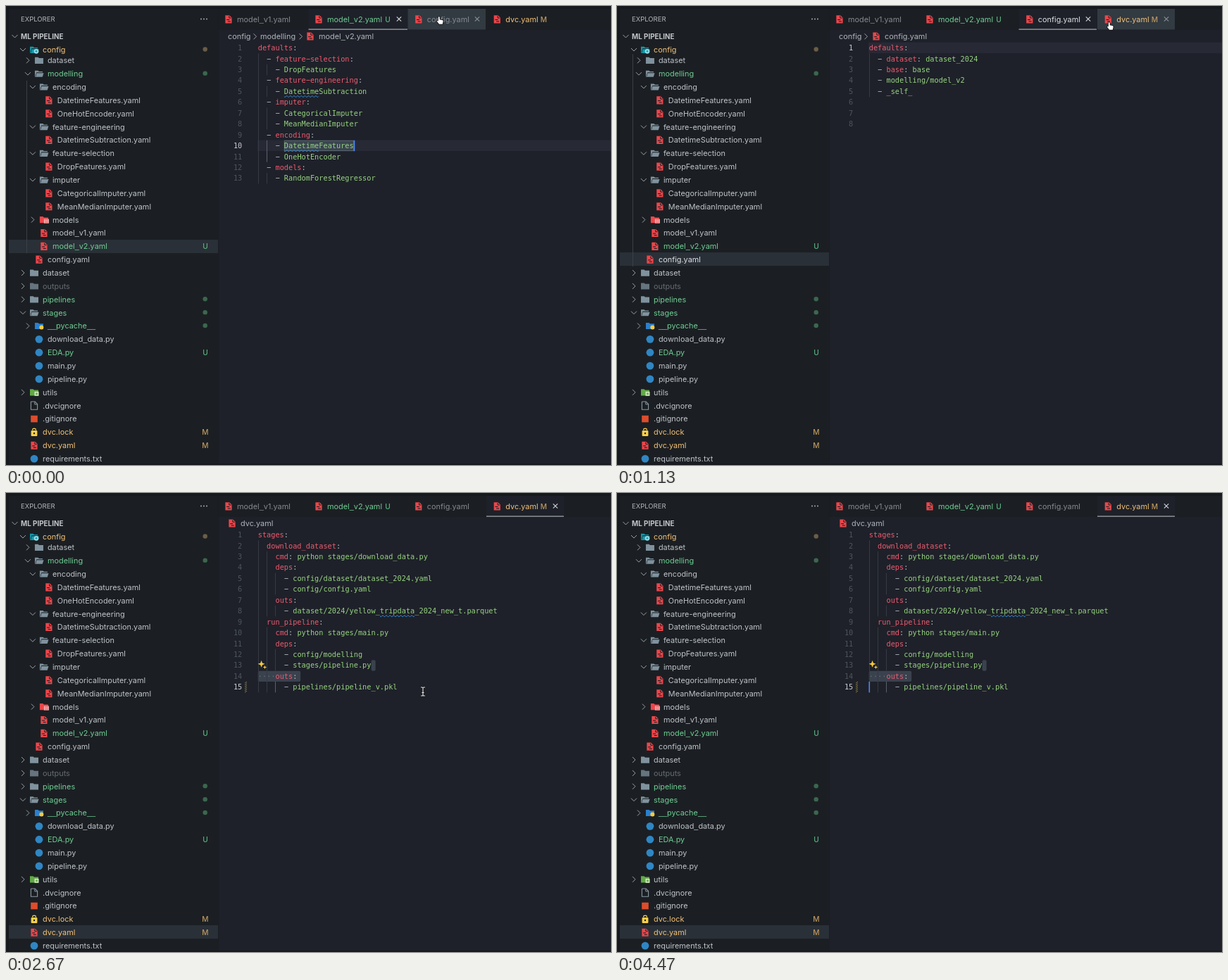
Animation of 859 by 652 pixels, one loop 4.51 s. Source, as an HTML page with a canvas:

```html
<!DOCTYPE html>
<html lang="en">
<head>
<meta charset="utf-8">
<title>YAML pipeline editor</title>
<style>
html, body { margin: 0; width: 100%; height: 100%; overflow: hidden; background: #16191d; }
canvas { display: block; width: 859px; height: 652px; }
</style>
</head>
<body>
<canvas id="stage" width="859" height="652"></canvas>
<script>
const ctx = document.getElementById('stage').getContext('2d');
const LOOP = 4510, OPEN_CONFIG = 200, OPEN_DVC = 2070, HIDE_MOUSE = 3900;
const UI = 'Inter, "Open Sans", sans-serif';
const WIDE = '"Liberation Sans", sans-serif';
const MONO = '10.28px "DejaVu Sans Mono", monospace';
const CHAR = 6.19, LINE = 15.43, ROW = 18.86, CODE_X = 357.7;
const C = {
  edge: '#16191d', side: '#1b1f23', editor: '#1e2129', row: '#2a3037',
  text: '#bec3c9', dim: '#666c73', tab: '#858a90', white: '#dde0e3',
  green: '#6fcd93', yellow: '#f2c077', mark: '#bd975e',
  key: '#ef596f', value: '#97d381', punct: '#b5bac2', red: '#ec464b', folder: '#7f929d'
};

// Tree rows: depth, icon, label, state (U, M, g = green dot, d = dimmed)
const tree = [
  [2, 'folder', 'dataset'], [2, 'open', 'modelling', 'g'],
  [3, 'open', 'encoding'], [4, 'yaml', 'DatetimeFeatures.yaml'], [4, 'yaml', 'OneHotEncoder.yaml'],
  [3, 'open', 'feature-engineering'], [4, 'yaml', 'DatetimeSubtraction.yaml'],
  [3, 'open', 'feature-selection'], [4, 'yaml', 'DropFeatures.yaml'],
  [3, 'open', 'imputer'], [4, 'yaml', 'CategoricalImputer.yaml'], [4, 'yaml', 'MeanMedianImputer.yaml'],
  [3, 'models', 'models'], [3, 'yaml', 'model_v1.yaml'], [3, 'yaml', 'model_v2.yaml', 'U'],
  [2, 'yaml', 'config.yaml'],
  [1, 'folder', 'dataset'], [1, 'folder', 'outputs', 'd'], [1, 'folder', 'pipelines', 'g'],
  [1, 'open', 'stages', 'g'], [2, 'cache', '__pycache__', 'g'],
  [2, 'py', 'download_data.py'], [2, 'py', 'EDA.py', 'U'], [2, 'py', 'main.py'], [2, 'py', 'pipeline.py'],
  [1, 'utils', 'utils'], [1, 'blank', '.dvcignore'], [1, 'git', '.gitignore'],
  [1, 'lock', 'dvc.lock', 'M'], [1, 'yaml', 'dvc.yaml', 'M'], [1, 'py', 'requirements.txt']
];

const tabs = [
  { x: 302, w: 128, label: 'model_v1.yaml' },
  { x: 429.5, w: 140.5, label: 'model_v2.yaml', badge: 'U', badgeX: 542 },
  { x: 570.5, w: 110.5, label: 'config.yaml' },
  { x: 682, w: 110, label: 'dvc.yaml', badge: 'M', badgeX: 763.5 }
];

// Guides: column, first line, last line, active
const docs = {
  model: {
    tab: 1, row: 14, guide: [29.5, 2, 14], crumbs: [['config', 315, 353], ['modelling', 361, 418]],
    file: 444, current: 10, highlight: true, caret: 22,
    guides: [[0, 2, 13], [2, 3, 3], [2, 5, 5], [2, 7, 8], [2, 10, 11, true], [2, 13, 13]],
    waves: [[5, 6], [10, 6]],
    lines: `defaults:
  - feature-selection:
    - DropFeatures
  - feature-engineering:
    - DatetimeSubtraction
  - imputer:
    - CategoricalImputer
    - MeanMedianImputer
  - encoding:
    - DatetimeFeatures
    - OneHotEncoder
  - models:
    - RandomForestRegressor`.split('\n')
  },
  config: {
    tab: 2, row: 15, guide: [22.5, 0, 15], crumbs: [['config', 315, 353]],
    file: 380, current: 1, highlight: true, caret: 0,
    guides: [[0, 2, 5]], waves: [],
    lines: `defaults:
  - dataset: dataset_2024
  - base: base
  - modelling/model_v2
  - _self_


`.split('\n')
  },
  dvc: {
    tab: 3, row: 29, crumbs: [], file: 333, current: 15, caret: 0,
    guides: [[0, 2, 15], [2, 3, 8], [2, 10, 15], [4, 5, 6], [4, 8, 8], [4, 12, 13], [4, 15, 15, true]],
    waves: [[8, 28]],
    lines: `stages:
  download_dataset:
    cmd: python stages/download_data.py
    deps:
      - config/dataset/dataset_2024.yaml
      - config/config.yaml
    outs:
      - dataset/2024/yellow_tripdata_2024_new_t.parquet
  run_pipeline:
    cmd: python stages/main.py
    deps:
      - config/modelling
      - stages/pipeline.py
    outs:
      - pipelines/pipeline_v.pkl`.split('\n')
  }
};

// Mouse path: start, end, from, to
const moves = [
  [680, 950, [615, 21], [699, 29]],
  [2230, 2630, [699, 29], [592, 282]],
  [2720, 3050, [592, 282], [565, 304]]
];

const lineY = n => 59.6 + (n - 1) * LINE;
const rowY = i => 77.3 + i * ROW;
const colX = c => CODE_X + c * CHAR;

function rect(x, y, w, h, color) {
  ctx.fillStyle = color;
  ctx.fillRect(x, y, w, h);
}
function round(x, y, w, h, r, color) {
  ctx.fillStyle = color;
  ctx.beginPath();
  ctx.roundRect(x, y, w, h, r);
  ctx.fill();
}
function disc(x, y, r, color) {
  ctx.fillStyle = color;
  ctx.beginPath();
  ctx.arc(x, y, r, 0, 7);
  ctx.fill();
}
function poly(points, x, y, color, stroke) {
  ctx.beginPath();
  points.forEach(([px, py]) => ctx.lineTo(x + px, y + py));
  if (stroke) {
    ctx.strokeStyle = color;
    ctx.lineWidth = stroke;
    ctx.stroke();
  } else {
    ctx.fillStyle = color;
    ctx.fill();
  }
}
// Underscores use a font with a wider underscore than the interface font.
function label(s, x, y, color, size = 10.9, weight = 400) {
  ctx.textAlign = 'left';
  ctx.fillStyle = color;
  for (const part of s.split(/(_+)/)) {
    ctx.font = `${weight} ${size}px ${part[0] === '_' ? WIDE : UI}`;
    ctx.fillText(part, x, y + size * 0.36);
    x += ctx.measureText(part).width;
  }
}
function badge(s, x, y) {
  ctx.font = `500 10.2px ${UI}`;
  ctx.textAlign = 'center';
  ctx.fillStyle = s === 'U' ? '#58b27e' : C.mark;
  ctx.fillText(s, x, y + 3.7);
}
function code(s, x, y, color, align = 'left') {
  ctx.font = MONO;
  ctx.textAlign = align;
  ctx.fillStyle = color;
  ctx.fillText(String(s).replace(/-/g, '\u2212'), x, y + 3.6);
}
function chevron(x, y, open) {
  poly(open ? [[-4, -2], [0, 2], [4, -2]] : [[-2, -4], [2, 0], [-2, 4]], x, y, '#9ba1a8', 1);
}
function cross(x, y, color) {
  poly([[-3.2, -3.2], [3.2, 3.2]], x, y, color, 1.1);
  poly([[-3.2, 3.2], [3.2, -3.2]], x, y, color, 1.1);
}

const page = [[-4.6, -5.6], [1.2, -5.6], [4.6, -2.2], [4.6, 5.6], [-4.6, 5.6]];
function folder(x, y, color) {
  poly([[-6, -4.5], [-1.5, -4.5], [0, -3.2], [6, -3.2], [6, 4.6], [-6, 4.6]], x, y, color);
}
function openFolder(x, y, color) {
  poly([[-6, -4.5], [-1.5, -4.5], [0, -3.2], [5, -3.2], [5, -2], [-3.6, -2], [-5.2, 3], [-5.2, 4.6], [-6, 4.6]], x, y, color);
  poly([[-3.4, -1], [6.6, -1], [4.8, 4.6], [-5, 4.6]], x, y, color);
}
const icons = {
  folder: (x, y) => folder(x, y, C.folder),
  open: (x, y) => openFolder(x, y, C.folder),
  config(x, y) {
    openFolder(x, y, '#1597a8');
    disc(x + 3, y + 2, 3.4, '#8ddde6');
    disc(x + 3, y + 2, 1.3, '#1597a8');
  },
  models(x, y) {
    folder(x, y, C.red);
    rect(x, y - 1, 7, 6, '#f4b9bb');
    for (let i = 0; i < 3; i++) rect(x + 1, y + i * 2 - .2, 5, .8, C.red);
  },
  cache(x, y) {
    folder(x, y, '#2a80cf');
    disc(x + 3.4, y + 2, 3, '#f5c945');
  },
  utils(x, y) {
    folder(x, y, '#62a947');
    rect(x + .5, y - 1, 6, 6, '#cfe8bc');
    disc(x + 3.5, y + 2, 1.5, '#62a947');
  },
  yaml(x, y) {
    poly(page, x, y, C.red);
    poly([[.8, -4.8], [.8, -1.8], [3.8, -1.8]], x, y, C.side, 1);
    rect(x - 2.8, y + .1, 4, 1.1, C.side);
    rect(x - 1.2, y + 2.6, 4, 1.1, C.side);
  },
  blank(x, y) {
    poly([...page, page[0]], x, y, '#8b99a3', 1.1);
    poly([[.8, -5.2], [.8, -1.8], [4.2, -1.8]], x, y, '#8b99a3', 1);
  },
  py: (x, y) => disc(x, y, 5.4, '#2f86c4'),
  git: (x, y) => rect(x - 4.8, y - 4.8, 9.6, 9.6, '#dd4c2c'),
  lock(x, y) {
    ctx.strokeStyle = '#f7cf4b';
    ctx.lineWidth = 1.3;
    ctx.beginPath();
    ctx.arc(x, y - 2.8, 2.5, Math.PI, 0);
    ctx.stroke();
    round(x - 4.4, y - 2.3, 8.8, 7.8, 1, '#f7cf4b');
    disc(x, y + 1.6, 1.2, C.side);
  }
};
const containers = ['folder', 'open', 'models', 'cache', 'utils'];
const stateColor = { U: C.green, g: C.green, M: C.yellow, d: C.dim };

function drawSidebar(doc) {
  rect(4, 4, 297.5, 646, C.side);
  label('EXPLORER', 21, 18.7, '#b2b7bd', 9.5);
  for (let i = -1; i < 2; i++) disc(281 + i * 4, 18.5, .9, '#b5bac0');
  chevron(12.5, 43, true);
  label('ML PIPELINE', 21, 43, '#c2c6cb', 9.85, 700);

  rect(4, Math.round(rowY(doc.row) - 9.8), 297, 19, C.row);
  if (doc.guide) {
    const [x, from, to] = doc.guide;
    rect(x - .5, rowY(from) - 9, 1, (to - from + 1) * ROW, '#3a4046');
  }
  chevron(24, 62, true);
  icons.config(40, 62.3);
  label('config', 52, 62, C.yellow);
  disc(282.7, 61.5, 3.2, '#6b5d47');

  tree.forEach(([depth, icon, name, state], i) => {
    const x = 52 + (depth - 1) * 6.95, y = rowY(i);
    if (containers.includes(icon)) chevron(x - 28, y, icon === 'open');
    ctx.globalAlpha = state === 'd' ? .75 : 1;
    icons[icon](x - 12, y);
    ctx.globalAlpha = 1;
    label(name, x, y, stateColor[state] || (i === doc.row ? C.white : C.text));
    if (state === 'g') disc(282.7, y - .5, 3.2, '#3c674e');
    if (state === 'U' || state === 'M') badge(state, 283, y);
  });
}

function drawTabs(doc, mouse) {
  rect(301.5, 4, 557.5, 29.5, C.side);
  tabs.forEach((tab, i) => {
    const active = i === doc.tab;
    const hover = mouse.y < 34 && mouse.x >= tab.x && mouse.x < tab.x + tab.w;
    if (active || hover) {
      rect(tab.x, 4, tab.w, 29.5, hover ? (active ? '#2b3137' : '#323a42') : C.editor);
      cross(tab.x + tab.w - 12, 18.5, active ? '#d5d8dc' : '#8b9197');
    }
    if (active) rect(tab.x, 32.6, tab.w, 1, '#c4c7cb');
    const x = i === 1 ? 456 : i === 0 ? 328 : tab.x + 27.3;
    icons.yaml(x - 12, 18.8);
    label(tab.label, x, 19, stateColor[tab.badge] || (active ? C.white : C.tab));
    if (tab.badge) badge(tab.badge, tab.badgeX, 18.8);
  });
}

function drawCrumbs(doc) {
  for (const [name, x, arrow] of doc.crumbs) {
    label(name, x, 43.3, '#afb4ba');
    chevron(arrow + .5, 43.3);
  }
  icons.yaml(doc.file - 12, 43);
  label(tabs[doc.tab].label, doc.file, 43.3, '#afb4ba');
}

function drawCodeLine(line, y) {
  const [, pad, dash, rest] = line.match(/^( *)(- )?(.*)$/);
  const [, key, colon, value] = rest.match(/^(?:([\w-]+)(:))?(.*)$/);
  let col = pad.length;
  for (const [part, color] of [[dash, C.punct], [key, C.key], [colon, C.punct], [value, C.value]]) {
    if (!part) continue;
    code(part, colX(col), y, color);
    col += part.length;
  }
}

function wave(line, col) {
  ctx.strokeStyle = '#3489d8';
  ctx.lineWidth = 1;
  ctx.beginPath();
  for (let x = 0; x <= 8 * CHAR; x++) ctx.lineTo(colX(col) + x, lineY(line) + 7.2 + Math.sin(x * 1.22));
  ctx.stroke();
}

function star(x, y, r) {
  ctx.fillStyle = '#f7cb3d';
  ctx.beginPath();
  for (let i = 0; i < 8; i++) {
    const d = i % 2 ? r * .38 : r, a = i * Math.PI / 4;
    ctx.lineTo(x + d * Math.cos(a), y + d * Math.sin(a));
  }
  ctx.fill();
}

function drawSelection(doc) {
  if (doc === docs.model) {
    const y = lineY(10) - 7.6;
    rect(colX(6), y, 16 * CHAR, 15.2, '#3b4551');
    ctx.strokeStyle = '#59636f';
    ctx.lineWidth = 1;
    ctx.strokeRect(colX(6) + .5, y + .5, 16 * CHAR - 1, 14.2);
  }
  if (doc === docs.dvc) {
    round(colX(26), lineY(13) - 7.5, 6, LINE, 2, '#3a424e');
    round(colX(0), lineY(14) - 7.5, 60.5, LINE, 2, '#3a424e');
    for (let i = 0; i < 4; i++) disc(colX(i + .5), lineY(14), .7, '#707782');
  }
}

function drawGutterMarks() {
  star(362.6, 242.8, 5);
  star(367.5, 247.5, 2.8);
  const top = lineY(15) - 7.5;
  for (let y = 0; y < 15; y += 2.6) poly([[-1.5, 2.2], [1.5, 0]], 340.5, top + y, '#8d7c45', 1);
}

function drawEditor(doc, caretOn) {
  rect(301.5, 33.5, 557.5, 616.5, C.editor);
  drawCrumbs(doc);
  if (doc.highlight) rect(357, lineY(doc.current) - 7.9, 502, LINE, '#272a35');
  drawSelection(doc);
  for (const [col, from, to, active] of doc.guides)
    rect(Math.round(colX(col)), lineY(from) - 7.7, 1, (to - from + 1) * LINE, active ? '#59606b' : '#343a44');
  doc.lines.forEach((line, i) => {
    const y = lineY(i + 1);
    code(i + 1, 335.3, y, i + 1 === doc.current ? '#c6cad0' : '#4d545e', 'right');
    drawCodeLine(line, y);
  });
  doc.waves.forEach(([line, col]) => wave(line, col));
  if (doc === docs.dvc) drawGutterMarks();
  if (caretOn) rect(colX(doc.caret) - .2, lineY(doc.current) - 7.7, 1.6, LINE, '#4f86f7');
}

function mouseAt(t) {
  let [x, y] = moves[0][2];
  for (const [start, end, from, to] of moves) {
    if (t < start) break;
    const u = Math.min(1, (t - start) / (end - start)), k = u * u * (3 - 2 * u);
    x = from[0] + (to[0] - from[0]) * k;
    y = from[1] + (to[1] - from[1]) * k;
  }
  return { x, y };
}

const hand = new Path2D('M-1.2-4.8c0-1.3 1.9-1.3 1.9 0v3l3.7.8c1 .2 1.4.9 1.2 1.9l-.8 3.9h-4.8l-2.7-3.5c-.8-1.1.4-1.8 1.5-.8z');
const beam = new Path2D('M-3-6h2q1 0 1 1.3q0-1.3 1-1.3h2M0-5v10M-3 6h2q1 0 1-1.3q0 1.3 1 1.3h2M-1.6 1.5h3.2');
function drawMouse({ x, y }) {
  ctx.save();
  ctx.translate(x, y);
  if (y < 50) {
    ctx.strokeStyle = '#111';
    ctx.lineWidth = 1.6;
    ctx.stroke(hand);
    ctx.fillStyle = '#fff';
    ctx.fill(hand);
  } else {
    for (const [color, width] of [['#111', 2.6], ['#eee', 1.1]]) {
      ctx.strokeStyle = color;
      ctx.lineWidth = width;
      ctx.stroke(beam);
    }
  }
  ctx.restore();
}

function draw(t) {
  const [doc, since] = t < OPEN_CONFIG ? [docs.model, 0]
    : t < OPEN_DVC ? [docs.config, OPEN_CONFIG] : [docs.dvc, OPEN_DVC];
  const mouse = mouseAt(t);
  rect(0, 0, 859, 652, C.edge);
  drawSidebar(doc);
  drawEditor(doc, (t - since) % 1000 < 500);
  drawTabs(doc, mouse);
  if (t < HIDE_MOUSE) drawMouse(mouse);
}

function tick(now) {
  draw(now % LOOP);
  requestAnimationFrame(tick);
}
draw(0);
requestAnimationFrame(tick);
</script>
</body>
</html>
```
